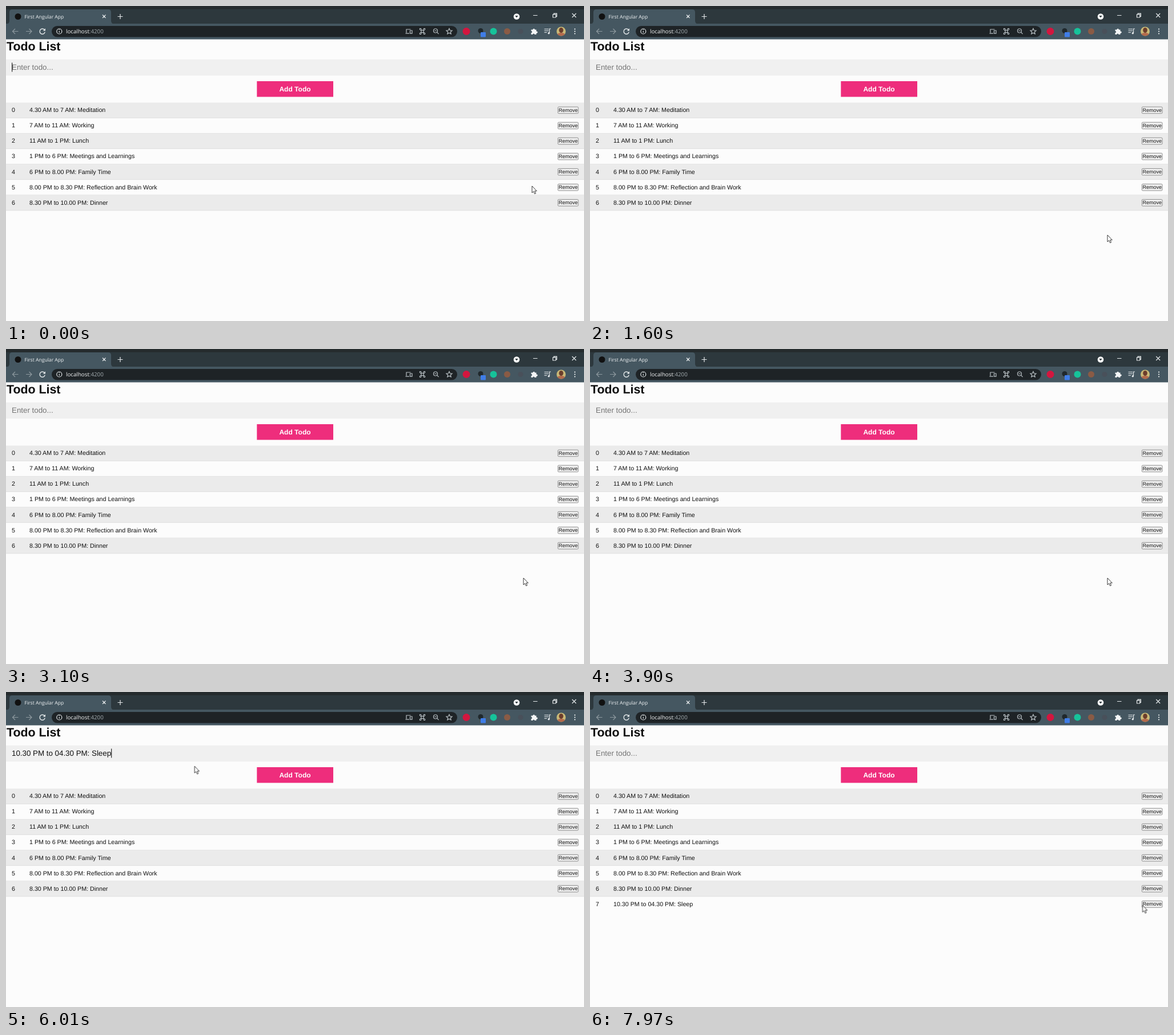
Write an HTML page that moves like this. It is 1012 by 553 pixels and loops after 8000 ms.

```html
<!DOCTYPE html>
<html lang="en">
<head>
<meta charset="utf-8">
<title>Todo List</title>
<style>
  html, body { margin: 0; width: 100%; height: 100%; overflow: hidden; background: #fcfcfc; }
  svg { display: block; width: 100%; height: 100%; }
  text { font-family: "Liberation Sans", Arial, sans-serif; text-rendering: geometricPrecision; white-space: pre; }
  .ui { font-family: "Open Sans", "Noto Sans", sans-serif; }
  .list { font-size: 10.67px; fill: #111; }
  .field { font-size: 13.33px; }
  .line { fill: none; stroke: #e4e8ea; stroke-width: 1.2; }
  .dim { stroke: #8d999f; }

  .pointer, .arrow, .beam, .caret, .hint, .typed, .added { animation: 8s step-end infinite; }
  .pointer { animation-name: travel; animation-timing-function: linear; }
  .arrow { animation-name: arrow; }
  .beam { animation-name: beam; }
  .caret { animation-name: blink; }
  .hint { animation-name: hint; }
  .typed { animation-name: typed; }
  .added { animation-name: added; }

  @keyframes travel {
    0% { transform: translate(921px, 316px); animation-timing-function: ease-in-out; }
    8.5%, 48.75% { transform: translate(906px, 402px); animation-timing-function: cubic-bezier(.45, 0, .35, 1); }
    59.6%, 70.2% { transform: translate(61.5px, 118px); animation-timing-function: cubic-bezier(.45, 0, .4, 1); }
    80.1% { transform: translate(501px, 138px); animation-timing-function: ease-out; }
    81.5%, 87.5% { transform: translate(502px, 143px); animation-timing-function: cubic-bezier(.45, 0, .35, 1); }
    97% { transform: translate(967px, 380px); animation-timing-function: ease-in-out; }
    99%, 100% { transform: translate(967.5px, 374.5px); }
  }
  @keyframes arrow { 0%, 73%, 100% { opacity: 1; } 58.9% { opacity: 0; } }
  @keyframes beam { 0%, 73%, 100% { opacity: 0; } 58.9% { opacity: 1; } }
  @keyframes blink {
    0%, 13.25%, 26.5%, 39.75%, 53%, 66.25% { opacity: 1; transform: none; }
    6.63%, 19.88%, 33.13%, 46.38%, 59.63% { opacity: 0; transform: none; }
    70.12% { opacity: 1; transform: translateX(174px); }
    76.75%, 100% { opacity: 0; transform: translateX(174px); }
  }
  @keyframes hint { 0%, 82.5%, 100% { opacity: 1; } 70.12% { opacity: 0; } }
  @keyframes typed { 0%, 82.5%, 100% { opacity: 0; } 70.12% { opacity: 1; } }
  @keyframes added { 0% { opacity: 0; } 82.5%, 100% { opacity: 1; } }
</style>
</head>
<body>
<svg viewBox="0 0 1012 553" preserveAspectRatio="none">
  <defs>
    <clipPath id="round"><circle cx="972" cy="44.5" r="8"/></clipPath>
  </defs>
  <rect width="1012" height="553" fill="#fcfcfc"/>

  <!-- Tab strip -->
  <rect width="1012" height="32" fill="#2d383d"/>
  <rect width="1012" height="5.5" fill="#252b2d"/>
  <path d="M0 31.5Q6 31.5 6 26V11Q6 6 11 6H179Q184 6 184 11V26Q184 31.5 190 31.5Z" fill="#455761"/>
  <circle cx="21" cy="18.5" r="5.5" fill="#111"/>
  <text class="ui" x="32.5" y="21.6" font-size="8.6" fill="#f1f4f5">First Angular App</text>
  <path class="line" d="M169 15.5l5.5 5.5m0-5.5l-5.5 5.5M195.500 18.500h9m-4.500-4.500v9" stroke-width="1.4"/>
  <circle cx="894" cy="18.500" r="5.300" fill="#fff"/>
  <path d="M891.300 17h5.400l-2.700 3.400Z" fill="#2d383d"/>
  <path class="line" d="M923 16.500h7.500M957.500 14.800h5.200v5.200h-5.200zM959.200 14.600v-1.500h5.200v5.200h-1.500M991.200 13l7 7m0-7l-7 7" stroke-width="1"/>

  <!-- Toolbar -->
  <rect y="31" width="1012" height="27.500" fill="#455761"/>
  <g class="line">
    <path class="dim" d="M21.500 44.500h-10m4.500-4.500l-4.500 4.500 4.500 4.500M35 44.500h10m-4.500-4.500l4.500 4.500-4.500 4.500"/>
    <path d="M67.300 41.800a4.600 4.600 0 1 0 .9 3.800" stroke-width="1.400"/>
  </g>
  <path d="M69 39.300v4.300h-4.300Z" fill="#e4e8ea"/>
  <rect x="80" y="35" width="710" height="19.500" rx="9.700" fill="#1e2326"/>
  <circle class="line" cx="93.300" cy="44.500" r="4.500"/>
  <path class="line" d="M93.300 43.800v3m0-4.700v-1.100"/>
  <text class="ui" x="105" y="47.900" font-size="9.750" fill="#f4f6f7">localhost<tspan fill="#a5adb1">:4200</tspan></text>
  <g class="line" stroke-width="1" style="stroke:#b9c1c5">
    <path d="M708.500 41h-7.500v6m-1.500 1.200h6.500M707.500 43h3.500v5.200h-3.500z"/>
    <path d="M724.500 42v-2.500h2.500m4 0h2.500v2.500m0 5v2.500h-2.500m-4 0h-2.500v-2.500M727 40v9m4-9v9M725 42.500h8m-8 4h8"/>
    <circle cx="752" cy="43.500" r="3.500"/>
    <path d="M754.600 46.200l3 3M750.300 43.500h3.400"/>
    <path d="M776 39.500l1.450 3.300 3.600.35-2.700 2.400.8 3.500-3.150-1.850-3.150 1.850.8-3.500-2.700-2.400 3.600-.35Z"/>
  </g>

  <!-- Extensions and profile -->
  <circle cx="806" cy="44.500" r="6.500" fill="#d3163f"/>
  <circle cx="831" cy="43.500" r="4.500" fill="#20282c"/>
  <rect x="831" y="46" width="9" height="8.500" rx="1" fill="#3f7de8"/>
  <circle cx="853.500" cy="44.500" r="6" fill="#16c39a"/>
  <circle cx="877.500" cy="44.500" r="5.500" fill="#8a5b45"/>
  <circle cx="901" cy="44.500" r="4.500" fill="#49505a"/>
  <path d="M919.500 41.500h3a1.700 1.700 0 1 1 3.400 0h2.600v3a1.700 1.700 0 1 1 0 3.200v2.300h-3a1.600 1.600 0 0 0-3.200 0h-2.800v-3a1.600 1.600 0 0 0 0-3.200Z" fill="#f4f6f7"/>
  <path class="line" d="M942.500 40.500h7.500m-7.500 3h7.500m-7.500 3h4.500M951.500 48v-8h2.500"/>
  <circle cx="950.300" cy="47.700" r="1.700" fill="#e4e8ea"/>
  <g clip-path="url(#round)">
    <rect x="963" y="36" width="18" height="18" fill="#c9b977"/>
    <ellipse cx="972" cy="42.500" rx="3.800" ry="4.500" fill="#6b3d2c"/>
    <path d="M963 54q1-7 9-7t9 7Z" fill="#b46a4c"/>
  </g>
  <g fill="#f1f4f5"><circle cx="996" cy="40.500" r="1.100"/><circle cx="996" cy="44.500" r="1.100"/><circle cx="996" cy="48.500" r="1.100"/></g>

  <!-- Page -->
  <text x="1" y="77.800" font-size="21.330" font-weight="bold" fill="#0c0c0c">Todo List</text>
  <rect y="93.700" width="1012" height="28.500" fill="#f0f0f0"/>
  <text class="field hint" x="10" y="112" fill="#757575">Enter todo...</text>
  <text class="field typed" x="10" y="112" fill="#111">10.30 PM to 04.30 PM: Sleep</text>
  <rect class="caret" x="10.200" y="99.500" width="1" height="16" fill="#000"/>
  <rect x="439.300" y="132" width="133.700" height="27.500" fill="#ee2d7c"/>
  <text x="506" y="149.900" font-size="12" font-weight="bold" fill="#fff" text-anchor="middle">Add Todo</text>
  <g id="rows"></g>

  <g class="pointer">
    <path class="arrow" d="M0 0V12l2.700-2.500 1.900 4.300 2-.9-1.900-4.100h3.600Z" fill="#fff" stroke="#222" stroke-width=".9" stroke-linejoin="round"/>
    <path class="beam" d="M-2.700-5.500h2q.7 0 .7.700v9.600q0 .7-.7.700h-2M2.700-5.500h-2q-.7 0-.7.700v9.600q0 .7.700.7h2" fill="none" stroke="#333" stroke-width=".9"/>
  </g>
</svg>
<script>
  const todos = [
    "4.30 AM to 7 AM: Meditation",
    "7 AM to 11 AM: Working",
    "11 AM to 1 PM: Lunch",
    "1 PM to 6 PM: Meetings and Learnings",
    "6 PM to 8.00 PM: Family Time",
    "8.00 PM to 8.30 PM: Reflection and Brain Work",
    "8.30 PM to 10.00 PM: Dinner",
    "10.30 PM to 04.30 PM: Sleep"
  ];
  const last = todos.length - 1;
  const row = (label, i) => `
    <g transform="translate(0 ${169.6 + i * 27.08})" class="${i === last ? "added" : ""}">
      ${i % 2 ? "" : '<rect width="1012" height="27" fill="#ebebeb"/>'}
      ${i === last ? "" : '<rect y="26.5" width="1012" height=".7" fill="#d8d8d8"/>'}
      <text class="list" x="10" y="16.600">${i}</text>
      <text class="list" x="41" y="16.600">${label}</text>
      <rect x="966.300" y="7.500" width="35.700" height="11.600" rx="1.500" fill="#efefef" stroke="#767676" stroke-width=".8"/>
      <text x="984.200" y="16.100" font-size="9" fill="#111" text-anchor="middle">Remove</text>
    </g>`;
  document.getElementById("rows").innerHTML = todos.map(row).join("");
</script>
</body>
</html>
```
